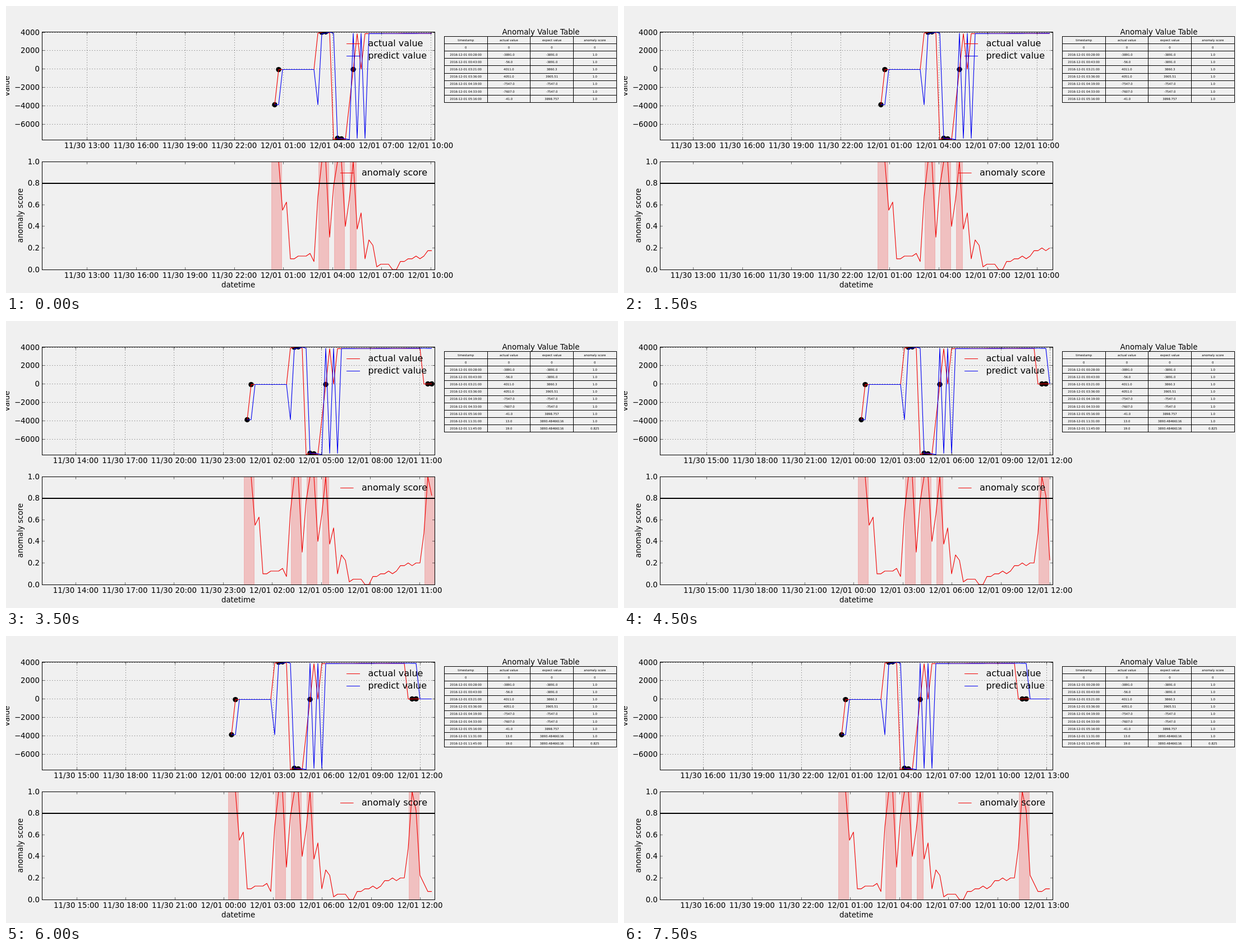
These frames come from a looping animation (1091x513 px, 8000 ms). An HTML page with a canvas:

```html
<!DOCTYPE html>
<html lang="en">
<head>
<meta charset="utf-8">
<title>Anomaly chart</title>
<style>
  html, body { margin: 0; width: 100%; height: 100%; overflow: hidden; background: #f0f0f0; }
  canvas { display: block; }
</style>
</head>
<body>
<canvas id="stage" width="1091" height="513"></canvas>
<script>
const ctx = document.getElementById('stage').getContext('2d');
const RED = '#f00000', BLUE = '#0000f0', BLACK = '#000', BG = '#f0f0f0';
const FONT = '"DejaVu Sans", sans-serif';
const PT = 80 / 72;
const SMALL = 12 * PT, LARGE = 14.4 * PT, TINY = 4.8 * PT;
const LOOP = 8000, STEP = 500;
const LEFT = 64.5, RIGHT = 764.5;
const TOP_BOX = { y: 46.5, h: 193 };
const LOW_BOX = { y: 278.5, h: 193 };
const FIRST = 2;          // index of the first sample
const GAP = 7;            // px between samples, 14.4 minutes apart
const LAST_X = 759;       // the newest sample always sits here
const HOUR = 700 / 24;

const fill = (n, v) => Array(n).fill(v);
const plateau = n => Array.from({ length: n }, (_, i) => 3858 + i * 1.8);

// All series start at sample FIRST.
const actual = [-3891, -56, ...fill(9, -50), 3905, 4011, 4051, 3900, -7680, -7547, -7607,
  -7680, -3870, -41, 3850, 0, ...plateau(22), 5, 13, 19, ...fill(6, 12)];
const predicted = [-3891, -3891, ...fill(9, -50), -3891, 3860.3, 3905.51, 4030, 3900, -7547, -7547,
  -7600, -7690, 3898.757, -7547, 3890, -7547, ...plateau(22), 3893.5, 3893.5, 8, ...fill(5, 14)];
const score = [1, 1, .55, .625, .1, .1, .125, .125, .125, .15, .075, .675, 1, 1, .3, .775, 1, 1,
  .4, .65, 1, .375, .525, .1, .275, .225, .025, .05, .05, .05, 0, 0, .075, .075, .1, .1, .125,
  .1, .125, .175, .175, .2, .175, .2, .2, .475, 1, .825, .225, .15, .075, .075, .1, .1];

// sample index, expected value, score
const anomalies = [
  [2, '-3891.0', '1.0'], [3, '-3891.0', '1.0'], [14, '3860.3', '1.0'], [15, '3905.51', '1.0'],
  [18, '-7547.0', '1.0'], [19, '-7547.0', '1.0'], [22, '3898.757', '1.0'],
  [48, '3893.48466116', '1.0'], [49, '3893.48466116', '0.825']
];
const spans = [[2, 3], [14, 15], [18, 19], [22, 22], [48, 49]];

const valueY = v => 112.7 - v * 0.0164;
const scoreY = s => 471.1 - s * 192.8;
const snapX = x => Math.round(x) + 0.5;
const snapY = y => Math.floor(y) + 0.5;
const pad = n => String(n).padStart(2, '0');

// The feed pauses for one step twice per loop.
function newestSample(time) {
  const step = Math.floor(time / STEP);
  return 42 + step - (step >= 8) - (step >= 13);
}

function text(str, x, y, size = SMALL, align = 'center') {
  ctx.font = `${size}px ${FONT}`;
  ctx.textAlign = align;
  ctx.fillStyle = BLACK;
  ctx.fillText(str, x, y);
}

function sideText(str, x, y) {
  ctx.save();
  ctx.translate(x, y);
  ctx.rotate(-Math.PI / 2);
  text(str, 0, 0);
  ctx.restore();
}

function line(x1, y1, x2, y2, color = BLACK, width = 1) {
  ctx.strokeStyle = color;
  ctx.lineWidth = width;
  ctx.beginPath();
  ctx.moveTo(x1, y1);
  ctx.lineTo(x2, y2);
  ctx.stroke();
}

function clipped(box, draw) {
  ctx.save();
  ctx.beginPath();
  ctx.rect(LEFT, box.y, RIGHT - LEFT, box.h);
  ctx.clip();
  draw();
  ctx.restore();
}

function series(data, newest, toX, toY, color) {
  ctx.strokeStyle = color;
  ctx.lineWidth = PT;
  ctx.lineJoin = 'round';
  ctx.beginPath();
  for (let k = FIRST; k <= newest; k++) ctx.lineTo(toX(k), toY(data[k - FIRST]));
  ctx.stroke();
}

function hourTicks(newest) {
  const now = newest * 0.24;
  const last = Math.floor(now + 0.1475);
  return Array.from({ length: 8 }, (_, i) => {
    const hour = last - 21 + i * 3;
    const day = hour < 0 ? '11/30' : '12/01';
    return { x: LAST_X + (hour - now) * HOUR, label: `${day} ${pad((hour + 24) % 24)}:00` };
  });
}

function frame(box, xs, ys) {
  const bottom = box.y + box.h, size = 4 * PT, width = 0.5 * PT;
  for (const x of xs) {
    line(x, box.y, x, box.y + size, BLACK, width);
    line(x, bottom, x, bottom - size, BLACK, width);
  }
  for (const y of ys) {
    line(LEFT, y, LEFT + size, y, BLACK, width);
    line(RIGHT, y, RIGHT - size, y, BLACK, width);
  }
  ctx.strokeStyle = BLACK;
  ctx.lineWidth = 1;
  ctx.strokeRect(LEFT, box.y, RIGHT - LEFT, box.h);
}

function axisLabels(labels, ys, ticks, baseline) {
  labels.forEach((label, i) => text(label, 60, Math.round(ys[i] + 4.5), SMALL, 'right'));
  for (const t of ticks) text(t.label, t.x, baseline);
}

function valueChart(newest, toX, ticks) {
  const xs = ticks.map(t => snapX(t.x));
  const values = [4000, 2000, 0, -2000, -4000, -6000];
  const ys = values.map(v => snapY(valueY(v)));
  const bottom = TOP_BOX.y + TOP_BOX.h;

  clipped(TOP_BOX, () => {
    ctx.fillStyle = BLACK;
    for (const [k] of anomalies) {
      if (k > newest) continue;
      ctx.beginPath();
      ctx.arc(toX(k), valueY(actual[k - FIRST]), 4.7, 0, Math.PI * 2);
      ctx.fill();
    }
    ctx.setLineDash([PT, 3 * PT]);
    for (const x of xs) line(x, bottom, x, TOP_BOX.y, BLACK, 0.5 * PT);
    for (const y of ys) line(LEFT, y, RIGHT, y, BLACK, 0.5 * PT);
    ctx.setLineDash([]);
    series(actual, newest, toX, valueY, RED);
    series(predicted, newest, toX, valueY, BLUE);
  });
  frame(TOP_BOX, xs, ys);

  axisLabels(values.map(v => String(v).replace('-', '\u2212')), ys, ticks, 254);
  sideText('value', 6, 143);
  line(607, 67.5, 631, 67.5, RED);
  text('actual value', 645.4, 72, LARGE, 'left');
  line(607, 89.5, 631, 89.5, BLUE);
  text('predict value', 645.4, 94, LARGE, 'left');
}

function scoreChart(newest, toX, ticks) {
  const levels = [0, 0.2, 0.4, 0.6, 0.8, 1];
  const ys = levels.map(scoreY);

  clipped(LOW_BOX, () => {
    for (const [a, b] of spans) {
      if (a > newest) continue;
      const x = toX(a) - 5.4, w = toX(Math.min(b, newest)) + 5.4 - x;
      ctx.fillStyle = ctx.strokeStyle = 'rgba(240, 0, 0, 0.2)';
      ctx.lineWidth = 1;
      ctx.fillRect(x, LOW_BOX.y, w, LOW_BOX.h);
      ctx.strokeRect(x, LOW_BOX.y - 2, w, LOW_BOX.h + 4);
    }
    series(score, newest, toX, scoreY, RED);
    const limit = Math.round(scoreY(0.8));
    line(LEFT, limit, RIGHT, limit, BLACK, 2);
  });
  frame(LOW_BOX, ticks.map(t => snapX(t.x)), ys.map(snapY));

  axisLabels(levels.map(s => s.toFixed(1)), ys, ticks, 486);
  sideText('anomaly score', 30, 374.5);
  text('datetime', 414, 503);
  line(596, 298.5, 619.5, 298.5, RED);
  text('anomaly score', 634, 303, LARGE, 'left');
}

function timestamp(k) {
  const minutes = Math.floor(k * 14.4 + 1e-6);
  return `2016-12-01 ${pad(Math.floor(minutes / 60))}:${pad(minutes % 60)}:00`;
}

function table(newest) {
  const x0 = 781.3, y0 = 54.5, w = 76.7, h = 13.1;
  const rows = [['timestamp', 'actual value', 'expect value', 'anomaly score'], fill(4, '0')];
  for (const [k, expected, level] of anomalies) {
    if (k <= newest) rows.push([timestamp(k), actual[k - FIRST].toFixed(1), expected, level]);
  }
  const bottom = snapY(y0 + rows.length * h);
  text('Anomaly Value Table', 953.5, 51);
  for (let c = 0; c <= 4; c++) {
    const x = Math.floor(x0 + c * w) + 0.5;
    line(x, y0 - 0.5, x, bottom + 0.5);
  }
  for (let r = 0; r <= rows.length; r++) {
    const y = snapY(y0 + r * h);
    line(x0, y, x0 + 4 * w, y);
  }
  rows.forEach((row, r) => row.forEach((cell, c) =>
    text(cell, x0 + (c + 0.5) * w, Math.round(y0 + (r + 0.5) * h + 1.8), TINY)));
}

function render(now) {
  const newest = newestSample(now % LOOP);
  const toX = k => LAST_X - (newest - k) * GAP;
  const ticks = hourTicks(newest);
  ctx.fillStyle = BG;
  ctx.fillRect(0, 0, 1091, 513);
  valueChart(newest, toX, ticks);
  scoreChart(newest, toX, ticks);
  table(newest);
}

const start = performance.now();
function tick() {
  render(performance.now() - start);
  requestAnimationFrame(tick);
}
tick();
</script>
</body>
</html>
```
